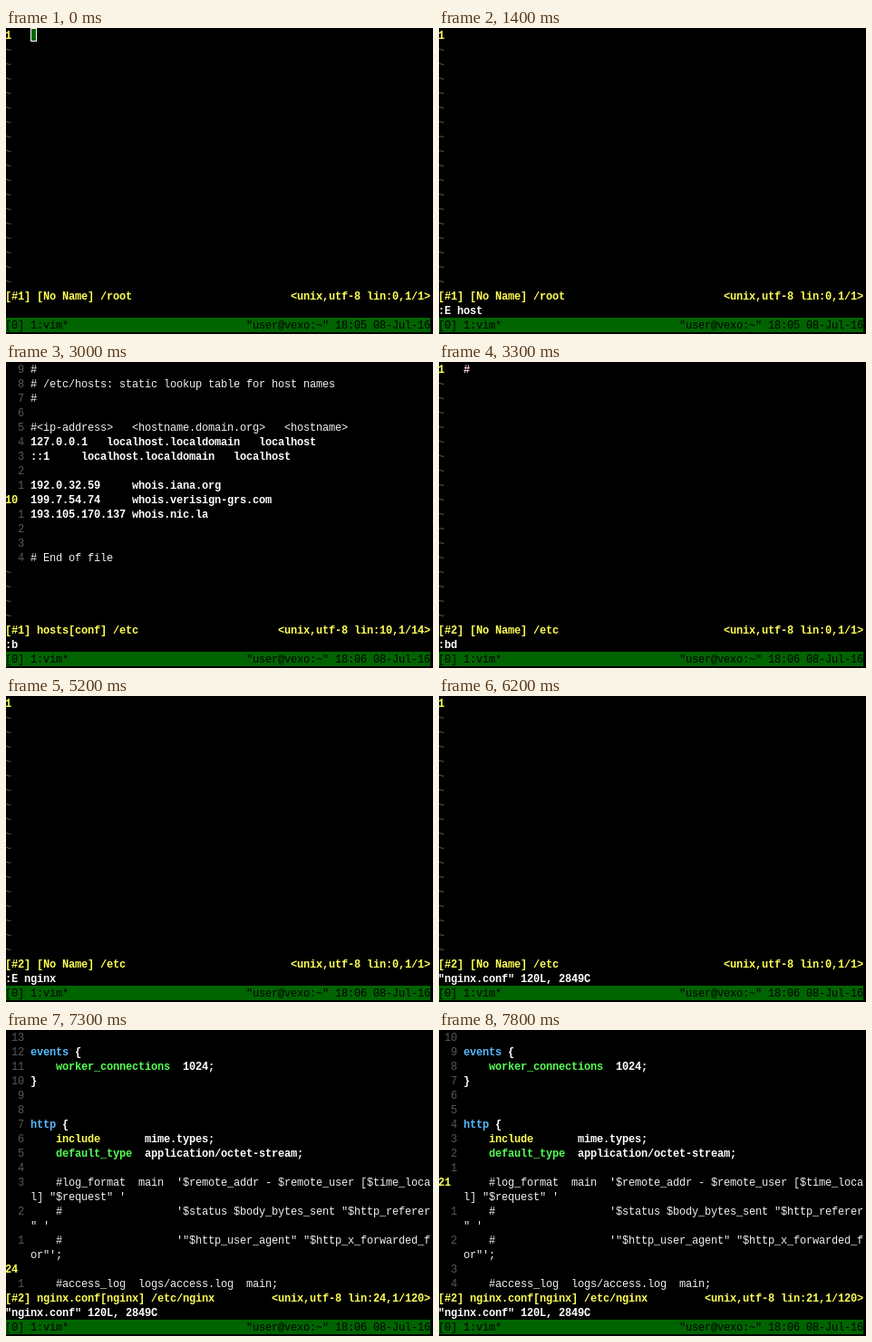
Write an HTML page that moves like this. It is 471 by 338 pixels and loops after 8 s.

```html
<!DOCTYPE html>
<html lang="en">
<head>
<meta charset="utf-8">
<title>Terminal editor session</title>
<style>
html, body { margin: 0; width: 100%; height: 100%; overflow: hidden; background: #000; }
#stage { position: relative; width: 471px; height: 338px; overflow: hidden; background: #000; }
#bar { position: absolute; left: 0; top: 320px; width: 468px; height: 16px; background: #006400; }
#screen span {
  position: absolute; white-space: pre; color: #fff;
  font: bold 12px/16px "Liberation Mono", "DejaVu Sans Mono", monospace;
  letter-spacing: calc(7px - 1ch); font-variant-ligatures: none;
}
#screen .yellow { color: #ffff55; }
#screen .blue { color: #55bbff; }
#screen .green { color: #55ff55; }
#screen .pink { color: #ffd0f0; }
#screen .hidden { color: #002800; }
#screen .note { color: #f0f0f0; font-weight: normal; }
#screen .dim { color: #585858; font-weight: normal; }
#screen .black { color: #000; font-weight: normal; }
#screen i {
  position: absolute; left: 27px; top: 0; width: 5px; height: 13px;
  border: 1px solid #fff; background: #006400;
}
</style>
</head>
<body>
<div id="stage"><div id="bar"></div><div id="screen"></div></div>
<script>
const LOOP = 8000, COLS = 67, GUTTER = 4, ROWS = 18;
const screen = document.getElementById('screen');

// A line is a list of screen rows, each a list of [class, text] runs.
const note = text => [[['note', text]]];
const plain = text => [[['', text]]];
const pair = (cls, word, rest) => [[[cls, word], ['', rest]]];

const hosts = [
  note('#'),
  note('# /etc/hosts: static lookup table for host names'),
  note('#'),
  plain(''),
  note('#<ip-address>   <hostname.domain.org>   <hostname>'),
  plain('127.0.0.1   localhost.localdomain   localhost'),
  plain('::1     localhost.localdomain   localhost'),
  plain(''),
  plain('192.0.32.59     whois.iana.org'),
  pair('', '1', '99.7.54.74     whois.verisign-grs.com'),
  plain('193.105.170.137 whois.nic.la'),
  plain(''),
  plain(''),
  note('# End of file')
];
const hostsUnderCursor = hosts.slice();
hostsUnderCursor[9] = pair('hidden', '1', '99.7.54.74     whois.verisign-grs.com');

const wrapped = (head, tail) => [...note('    ' + head), ...note(tail)];
const nginx = [
  plain(''),
  pair('blue', 'events', ' {'),
  pair('green', '    worker_connections', '  1024;'),
  plain('}'),
  plain(''),
  plain(''),
  pair('blue', 'http', ' {'),
  pair('yellow', '    include', '       mime.types;'),
  pair('green', '    default_type', '  application/octet-stream;'),
  plain(''),
  wrapped("#log_format  main  '$remote_addr - $remote_user [$time_loca", 'l] "$request" \''),
  wrapped("#                  '$status $body_bytes_sent \"$http_referer", '" \''),
  wrapped("#                  '\"$http_user_agent\" \"$http_x_forwarded_f", 'or"\';'),
  plain(''),
  note('    #access_log  logs/access.log  main;')
];

const empty = { lines: [plain('')], first: 1, line: 1, pos: '0,1/1' };
const blank1 = { ...empty, name: '[#1] [No Name] /root' };
const blank2 = { ...empty, name: '[#2] [No Name] /etc' };
const ghost = { ...blank2, lines: [[[['pink', '#']]]] };
const hostsView = { lines: hosts, first: 1, line: 10, pos: '10,1/14', name: '[#1] hosts[conf] /etc' };
const hostsCursor = { ...hostsView, lines: hostsUnderCursor };
const nginxAt = line => ({
  lines: nginx, first: 11, line, pos: line + ',1/120', name: '[#2] nginx.conf[nginx] /etc/nginx'
});

const states = [];
const at = (time, view, cmd, cursor = false) => states.push({ time, view, cmd, cursor });
function type(view, base, text, start) {
  for (let i = 0; i < text.length; i++) at(start + i * 100, view, base + text.slice(0, i + 1));
}

const loaded = '"nginx.conf" 120L, 2849C';
at(0, blank1, '', true);
at(200, blank1, ':');
at(700, blank1, ':E');
type(blank1, ':E ', 'hosts', 1100);
at(1800, hostsCursor, '"hosts" 14L, 296C');
at(2800, hostsView, ':');
at(3000, hostsView, ':b');
at(3200, hostsView, ':bd');
at(3300, ghost, ':bd');
at(3500, blank2, ':');
at(4400, blank2, ':E');
type(blank2, ':E ', 'ngin', 4700);
at(5200, blank2, ':E nginx');
at(5700, blank2, ':E /etc/nginx/nginx.conf');
at(6200, blank2, loaded);
at(6300, nginxAt(25), loaded);
at(7300, nginxAt(24), loaded);
at(7500, nginxAt(23), loaded);
at(7600, nginxAt(22), loaded);
at(7800, nginxAt(21), loaded);

function put(row, col, text, cls = '') {
  const span = document.createElement('span');
  span.className = cls;
  span.textContent = text;
  span.style.left = col * 7 - 1 + 'px';
  span.style.top = row * 16 + 1 + 'px';
  screen.append(span);
}
const putRight = (row, text, cls) => put(row, COLS - text.length, text, cls);

function draw({ time, view, cmd, cursor }) {
  screen.textContent = '';
  if (cursor) screen.append(document.createElement('i'));
  let row = 0;
  view.lines.forEach((rows, i) => {
    const gap = Math.abs(view.first + i - view.line);
    if (gap) put(row, 0, String(gap).padStart(3), 'dim');
    else put(row, 0, String(view.line), 'yellow');
    for (const runs of rows) {
      let col = GUTTER;
      for (const [cls, text] of runs) {
        put(row, col, text, cls);
        col += text.length;
      }
      row++;
    }
  });
  for (; row < ROWS; row++) put(row, 0, '~', 'dim');
  put(18, 0, view.name, 'yellow');
  putRight(18, `<unix,utf-8 lin:${view.pos}>`, 'yellow');
  put(19, 0, cmd);
  put(20, 0, '[0] 1:vim*', 'black');
  putRight(20, `"user@vexo:~" 18:0${time < 3000 ? 5 : 6} 08-Jul-16`, 'black');
}

let shown;
const start = performance.now();
function tick() {
  const t = (performance.now() - start) % LOOP;
  const state = states.findLast(s => s.time <= t);
  if (state !== shown) draw(shown = state);
  requestAnimationFrame(tick);
}
tick();
</script>
</body>
</html>
```
